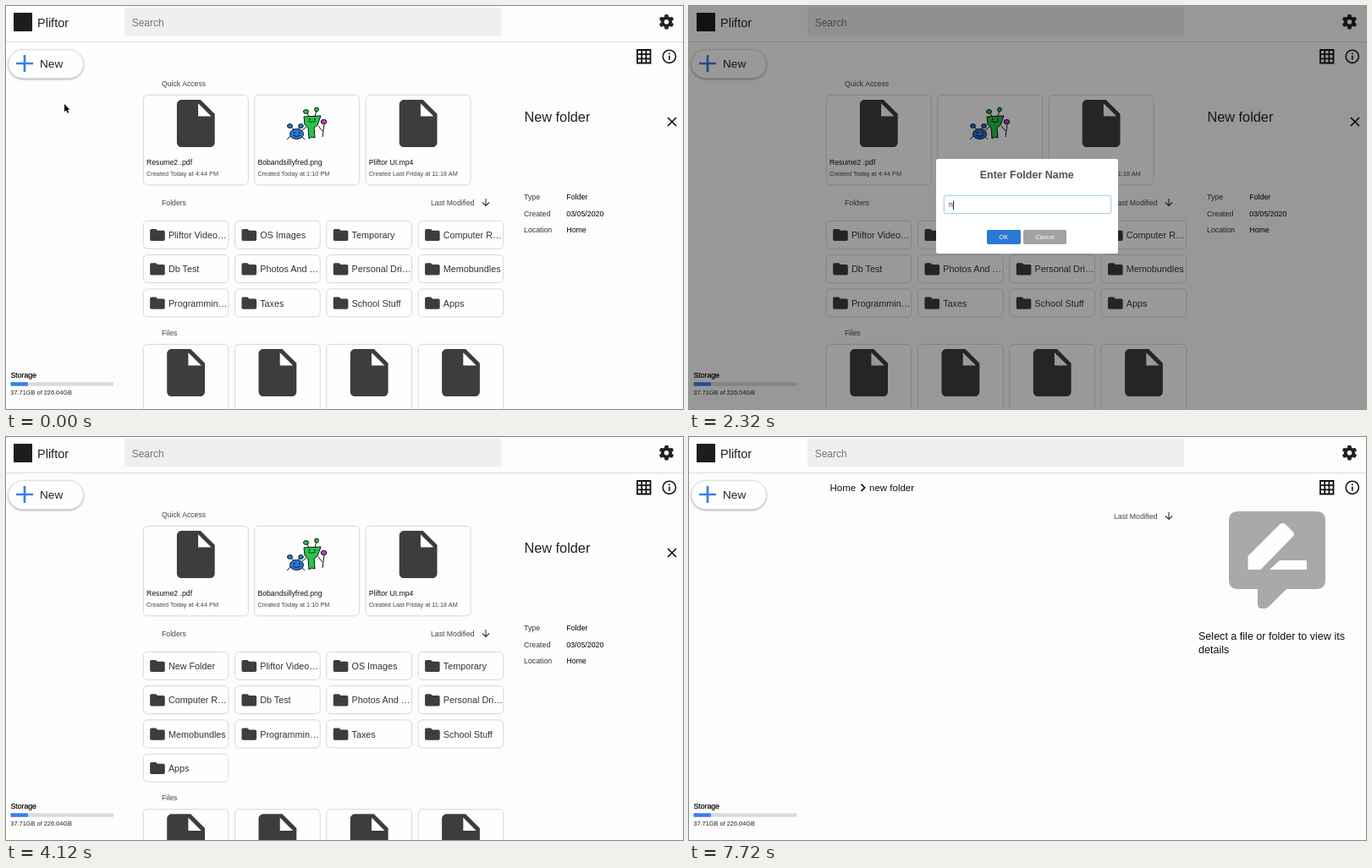
Animation of 800x477 px, one loop 7.8 s. Source, as an HTML page:

```html
<!DOCTYPE html>
<html lang="en">
<head>
<meta charset="utf-8">
<title>File drive</title>
<style>
html, body { margin: 0; width: 100%; height: 100%; overflow: hidden; background: #fdfdfe; }
body { font-family: "Liberation Sans", Arial, sans-serif; }
#stage { position: absolute; left: 0; top: 0; width: 800px; height: 477px; overflow: hidden; }
#stage > * { position: absolute; }
svg { display: block; left: 0; top: 0; }
text { white-space: pre; }
#menu { left: 0; top: 43px; width: 203px; height: 0; overflow: hidden; background: #fdfdfe; }
#shade { inset: 0; background: #000; opacity: 0; }
#popup { left: 292px; top: 181px; width: 214.5px; height: 112px; border-radius: 2.5px; background: #fff; opacity: 0; }
#popup > * { position: absolute; box-sizing: border-box; }
#title { top: 11px; width: 100%; text-align: center; font: bold 12.5px/16px "Liberation Sans", Arial, sans-serif; color: #505050; }
#field { left: 9px; top: 43px; width: 197.5px; height: 22px; padding-left: 5px; border: 1px solid #d9d9d9; border-radius: 2px; line-height: 20px; font-size: 8.7px; color: #333; white-space: pre; }
#field i { font-style: normal; font-size: 0; }
#caret { display: inline-block; width: .8px; height: 10px; background: #222; vertical-align: middle; }
.button { top: 84px; height: 17px; border-radius: 2px; color: #fff; font-size: 7.3px; line-height: 17px; text-align: center; }
</style>
</head>
<body>
<div id="stage">
  <svg id="page" width="800" height="477"></svg>
  <div id="menu"></div>
  <div id="shade"></div>
  <div id="popup">
    <div id="title">Enter Folder Name</div>
    <div id="field"></div>
    <div class="button" style="left:60px;width:39.5px;background:#2b78d3">OK</div>
    <div class="button" style="left:103px;width:51px;background:#a2a2a2">Cancel</div>
  </div>
  <svg id="pointer" width="12" height="16" viewBox="-1 -1 12 16">
    <path d="M0 0v9.2l2.1-1.9 1.5 3.5 1.6-.7-1.5-3.4h2.7z" stroke="#fff" stroke-width=".8" paint-order="stroke"/>
  </svg>
</div>
<script>
const LOOP = 7800;
const $ = id => document.getElementById(id);

// Drawing helpers
const text = (x, y, size, str, fill = '#333', more = '') =>
  `<text x="${x}" y="${y}" font-size="${size}" fill="${fill}" ${more}>${str}</text>`;
const box = (x, y, w, h, r, more) =>
  `<rect x="${x}" y="${y}" width="${w}" height="${h}" rx="${r}" ${more}/>`;
const path = (d, more = '') => `<path d="${d}" ${more}/>`;
const line = (d, color, width, more = '') =>
  path(d, `fill="none" stroke="${color}" stroke-width="${width}" ${more}`);
const icon = (d, x, y, scale, fill = '#3d3d3f') =>
  path(d, `transform="translate(${x} ${y}) scale(${scale})" fill="${fill}" fill-rule="evenodd"`);
const group = (id, body) => `<g id="${id}">${body}</g>`;
const card = (x, y, w, h) => box(x, y, w, h, 5, 'fill="#fefefe" stroke="#d6d7d9"');

const FOLDER = 'M10 4H4C2.9 4 2 4.9 2 6v12c0 1.1.9 2 2 2h16c1.1 0 2-.9 2-2V8c0-1.1-.9-2-2-2h-8z';
const DOC = 'M6 2C4.9 2 4 2.9 4 4v16c0 1.1.9 2 2 2h12c1.1 0 2-.9 2-2V8l-6-6z';
const FOLD = 'M13 9V3.5L18.5 9z';
const PLUS = 'M14 10h2v2h2v2h-2v2h-2v-2h-2v-2h2z';
const UP = 'M12 9l4.5 4.5H14V18h-4v-4.5H7.5z';

const column = i => 162.2 + i * 108.3;

function folderItem(name, i, ink) {
  const x = column(i % 4), y = 254.3 + (i >> 2) * 40.3;
  const back = ink ? box(x, y, 100.7, 33, 5, 'fill="#3c85ee" stroke="#3c85ee"') : card(x, y, 100.7, 33);
  return back + icon(FOLDER, x + 6.2, y + 6.2, .88, ink) + text(x + 29.7, y + 20.8, 10.8, name, ink);
}

function listing(names, shift) {
  let out = names.map((n, i) => folderItem(n, i)).join('');
  out += text(184, 390 + shift, 8.7, 'Files', '#444');
  for (let i = 0; i < 4; i++) {
    const x = column(i), y = 400.4 + shift;
    out += card(x, y, 100.7, 110) + icon(DOC + FOLD, x + 16.8, y, 2.8);
  }
  return out;
}

function quickItem(i, name, date, art) {
  const x = 162.3 + i * 131.4;
  return card(x, 105.4, 124, 106.4) + (art || icon(DOC + FOLD, x + 28.4, 105.4, 2.8)) +
    text(x + 3.7, 187.6, 8.7, name, '#111') + text(x + 3.7, 200.6, 7.33, date, '#444');
}

function doodle() {
  const ink = 'stroke="#111" stroke-width="1"';
  const dot = (x, y, rx, ry, fill) => `<ellipse cx="${x}" cy="${y}" rx="${rx}" ry="${ry}" fill="${fill}" ${ink}/>`;
  return line('M340 146l-4-4M345 146l3-4M336 154l-4 4M350 155l3 3M358 131l-3-6M365 131l2-8M355 143l-6 5M369 142l5 6M376 140l-2 15', '#111', 1) +
    dot(343.5, 151.5, 8, 6, '#2878e0') + dot(335.5, 142, 3, 2.4, '#2878e0') + dot(348.5, 142, 2.8, 2.5, '#2878e0') +
    path('M352 131l20-1-4 11-4 3 1 12-4-1-3 2-1-13-4-4z', `fill="#25c748" ${ink}`) +
    dot(354.5, 125, 3, 2.4, '#25c748') + dot(367, 122.5, 2.4, 2.4, '#25c748') + dot(375.5, 137, 3.3, 2.6, '#d92bd0') +
    line('M339 153q4 3 9 0M357 136q4 3 9 0', '#111', .9) +
    path('M340 149h1.5v1.5h-1.5zM346 149h1.5v1.5h-1.5zM358 133h1.5v1.5h-1.5zM364 133h1.5v1.5h-1.5z');
}

function sortLabel(y) {
  return text(502, y, 8.7, 'Last Modified', '#444') +
    line(`M567 ${y - 8}v8.5m-4-4l4 4 4-4`, '#333', 1.1);
}

function gear() {
  let out = '<circle cx="780.5" cy="18.7" r="4.7" fill="none" stroke="#1f1f1f" stroke-width="3.8"/>';
  for (let a = 0; a < 360; a += 60)
    out += path('M-2.6-6l.8-2.8h3.6l.8 2.8z', `fill="#1f1f1f" transform="translate(780.5 18.7) rotate(${a})"`);
  return out;
}

function header() {
  return line('M0 42.5H800', '#dcdcde', 1) + box(9, 8, 22, 22, 0, 'fill="#1d1d1f"') +
    text(37, 24.5, 14.5, 'Pliftor', '#222') +
    box(140, 2, 445, 33.5, 1, 'fill="#eeeff0"') + text(148.7, 23.8, 12, 'Search', '#757575') + gear() +
    line('M746 52h15.5v15.5H746zM751.2 52v15.5M756.4 52v15.5M746 57.2h15.5M746 62.4h15.5', '#111', 1.8) +
    '<circle cx="783.8" cy="59.8" r="7.6" fill="none" stroke="#1a1a1a" stroke-width="1.6"/>' +
    line('M783.8 58.8v5M783.8 55.6v1.7', '#1a1a1a', 1.7);
}

function sidebar() {
  return box(2.8, 51.8, 88.6, 33.6, 16.8, 'fill="#fefefe" stroke="#dedee0" style="filter:drop-shadow(0 1px 1px #0005)"') +
    line('M12 68h20M22 58v20', '#3b7ded', 2.7) + text(40, 72.8, 13.6, 'New', '#222') +
    text(5.5, 439.6, 8.7, 'Storage', '#000', 'stroke="#000" stroke-width=".2"') +
    box(5.5, 445.3, 121.5, 4.4, 0, 'fill="#d9dadd"') + box(5.5, 445.3, 20.3, 4.4, 0, 'fill="#3a7df0"') +
    text(5.3, 460.4, 7.4, '37.71GB of 226.04GB', '#222');
}

function details() {
  const rows = [['Type', 'Folder'], ['Created', '03/05/2020'], ['Location', 'Home']];
  return text(612.5, 137, 16.3, 'New folder', '#222') + line('M782 132l10 10m0-10l-10 10', '#111', 1.7) +
    rows.map(([k, v], i) => text(612, 229.2 + i * 19.5, 8.8, k) + text(662.3, 229.2 + i * 19.5, 8.8, v, '#000')).join('');
}

const hint = y => text(602, y, 12.55, 'Select a file or folder to view its', '#111') + text(602, y + 16, 12.55, 'details', '#111');

const bubble = path('M649 88h92q11 0 11 11v70q0 11-11 11h-35l-21 21q-2 2-5 2h-3q-5 0-5-5v-18h-23q-11 0-11-11v-70q0-11 11-11z', 'fill="#a9a9a9"') +
  path('M660.5 157v-16l37-37q4-4 8 0l8 8q3 3 0 6l-38 39zM686 157l12-11h32v11z', 'fill="#fefefe"');

const folders = ['Pliftor Video…', 'OS Images', 'Temporary', 'Computer R…', 'Db Test', 'Photos And …', 'Personal Dri…',
  'Memobundles', 'Programmin…', 'Taxes', 'School Stuff', 'Apps'];

$('page').innerHTML = header() + sidebar() +
  group('home',
    text(184, 95, 8.7, 'Quick Access', '#444') +
    quickItem(0, 'Resume2 .pdf', 'Created Today at 4:44 PM') +
    quickItem(1, 'Bobandsillyfred.png', 'Created Today at 1:10 PM', doodle()) +
    quickItem(2, 'Pliftor UI.mp4', 'Created Last Friday at 11:18 AM') +
    text(184, 236, 8.7, 'Folders', '#444') + sortLabel(236) + details() +
    group('before', listing(folders, 0)) +
    group('after', listing(['New Folder', ...folders], 40.3) + group('picked', folderItem('New Folder', 0, '#fff')))) +
  group('opened',
    text(166.5, 64, 11.5, 'Home', '#111') + line('M203.5 55.8l4.2 4.2-4.2 4.2', '#111', 1.7) +
    text(213, 64, 11.5, 'new folder', '#111') + sortLabel(97) +
    group('plain', hint(101.8)) + group('full', bubble + hint(239.6)) +
    group('status', path('M0 464.5h261q3 0 3 3V477H0z', 'fill="#282b2d"') +
      text(-1, 474.8, 7.8, 'Waiting for quolta-shelf.com...', '#a9abac')));

$('menu').innerHTML = `<svg width="203" height="126" viewBox="0 43 203 126">` +
  icon(FOLDER + PLUS, 10.7, 52, 1.15, '#1f1f21') + text(46, 69.6, 10.8, 'Folder', '#222') +
  line('M0 85.5h203', '#dcdcde', 1) +
  icon(DOC + FOLD + UP, 11, 93.3, 1.14, '#1f1f21') + text(46, 111, 10.8, 'File Upload', '#222') +
  icon(FOLDER + UP, 10.7, 134.3, 1.15, '#1f1f21') + text(46, 152, 10.8, 'Folder Upload', '#222') + '</svg>';

$('field').innerHTML = [...'new folder'].map((c, i) => `<i style="animation-delay:${i * 53}ms">${c}</i>`).join('') +
  '<b id="caret"></b>';

// Motion: every track is a keyframe rule over the whole loop, timed in ms
let rules = '';
let count = 0;
function track(target, ease, steps) {
  const name = 'track' + count++;
  const all = [[0, steps[0][1]], ...steps, [LOOP, steps[steps.length - 1][1]]];
  const body = all.map(([t, css]) => `${t / LOOP * 100}%{${css}}`).join('');
  rules += `@keyframes ${name}{${body}}${target}{animation:${name} ${LOOP}ms ${ease} infinite}`;
}
const show = (target, from, to = LOOP) => track(target, 'step-end',
  [[0, `opacity:${from ? 0 : 1}`], [from, 'opacity:1'], [to, `opacity:${to < LOOP ? 0 : 1}`]]);

show('#home', 0, 6000);
show('#before', 0, 4080);
show('#after', 4080);
show('#opened', 6000);
show('#plain', 6000, 6480);
show('#full', 6480);
track('#picked', 'ease', [[5240, 'opacity:0'], [5340, 'opacity:1']]);
track('#status', 'linear', [[6079, 'opacity:0'], [6080, 'opacity:1'], [6560, 'opacity:1'], [6660, 'opacity:0']]);

track('#menu', 'ease', [[580, 'height:0'], [1080, 'height:125px'], [1672, 'height:125px'], [2120, 'height:0']]);
track('#shade', 'ease', [[1682, 'opacity:0'], [1782, 'opacity:.4'], [3947, 'opacity:.4'], [4047, 'opacity:0']]);

const pose = (scale, alpha) => `transform:scale(${scale});opacity:${alpha}`;
track('#popup', 'ease', [[1688.9, pose(.7, 0)], [1689, pose(.7, 1)], [1817, pose(1.05, 1)], [1922, pose(.95, 1)],
  [1982, pose(1, 1)], [3947, pose(1, 1)], [4097, pose(.5, 0)]]);
track('#field', 'ease', [[1710, 'border-color:#d9d9d9;box-shadow:0 0 0 #c4e6f500'],
  [2010, 'border-color:#a9d6ea;box-shadow:0 0 2px #b4dff5']]);
track('#field i', 'step-end', [[0, 'font-size:0'], [2320, 'font-size:8.7px']]);
track('#caret', 'step-end', [[0, 'opacity:1'], [3300, 'opacity:0'], [3800, 'opacity:1'], [3940, 'opacity:0']]);

const at = (x, y, alpha = 1) => `transform:translate(${x - 1}px,${y - 1}px);opacity:${alpha}`;
track('#pointer', 'ease-in-out', [[40, at(69, 116)], [400, at(66, 71)], [960, at(66, 71)], [1320, at(67, 66)],
  [2319, at(67, 66)], [2320, at(67, 66, 0)], [4399, at(67, 66, 0)], [4400, at(67, 66)], [5120, at(209, 255)],
  [6639, at(209, 255)], [6640, at(209, 255, 0)]]);

const sheet = document.createElement('style');
sheet.textContent = rules;
document.head.append(sheet);
</script>
</body>
</html>
```
